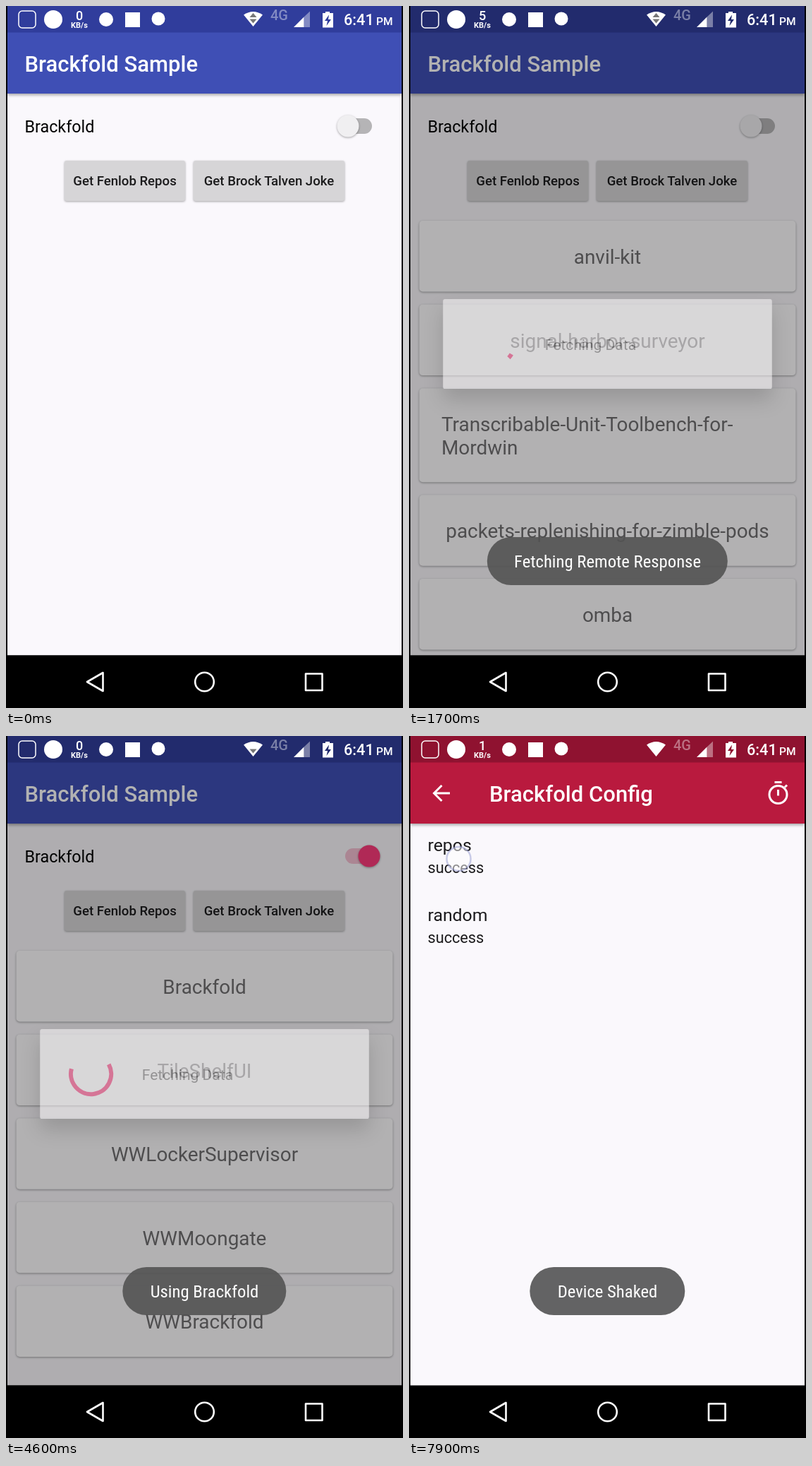
Write an HTML page that moves like this. It is 563 px wide and 994 px high and loops after 8000 ms.

```html
<!DOCTYPE html>
<html lang="en">
<head>
<meta charset="utf-8">
<title>Brackfold Sample</title>
<style>
  html, body { margin: 0; width: 100%; height: 100%; overflow: hidden; background: #000; }
  svg { display: block; width: 563px; height: 994px; font-family: Roboto, "Noto Sans", sans-serif; }
  .bar { filter: drop-shadow(0 2px 2px rgba(0,0,0,.35)); }
  .btn { fill: #d6d5d7; filter: drop-shadow(0 1px 1.5px rgba(0,0,0,.35)); }
  .btn.down { filter: drop-shadow(0 3px 4px rgba(0,0,0,.4)); }
  .btnText { font-size: 18.6px; font-weight: 500; fill: #1b1b1c; }
  .title { font-size: 31px; font-weight: 500; fill: #fff; }
  .card { fill: #fefdff; filter: drop-shadow(0 1.5px 1.5px rgba(0,0,0,.36)); }
  .cardText { font-size: 27.9px; fill: #6f6e70; }
  .mid { text-anchor: middle; }
  .thumb { filter: drop-shadow(0 1px 1.5px rgba(0,0,0,.35)); }
  .dialog { fill: #fffdff; filter: drop-shadow(0 16px 14px rgba(0,0,0,.3)); }
  .toastText { font-family: "Roboto Condensed", Roboto, sans-serif; fill: #fff; text-anchor: middle; }
  .line { fill: none; stroke: #fff; }
  #keys { filter: drop-shadow(0 1px 1px rgba(0,0,0,.3)); }
</style>
</head>
<body>
<svg viewBox="0 0 563 994">
  <defs>
    <clipPath id="listClip"><rect x="2" y="291.5" width="559" height="628"/></clipPath>
    <clipPath id="btnClip"><rect x="83" y="219" width="171" height="57" rx="3"/></clipPath>
    <clipPath id="screen"><rect x="2" width="559" height="994"/></clipPath>
  </defs>
  <rect width="563" height="994"/>

  <g clip-path="url(#screen)">
    <g id="main">
      <rect x="2" width="559" height="919.5" fill="#faf8fc"/>
      <rect class="bar" x="2" y="37" width="559" height="87" fill="#3f4fb5"/>
      <rect x="2" width="559" height="37.5" fill="#303d9c"/>
      <text class="title" x="26.5" y="93">Brackfold Sample</text>
      <text x="26.5" y="179" font-size="23.3">Brackfold</text>
      <rect id="track" x="481" y="159" width="38" height="22" rx="11"/>
      <circle id="halo" cy="170.500" r="30" fill="#fb3a7b"/>
      <circle id="thumb" class="thumb" cy="170" r="15.500"/>
      <rect id="repoBtn" class="btn" x="83" y="219" width="171" height="57" rx="3"/>
      <g clip-path="url(#btnClip)"><circle id="ripple" cx="181" cy="248" fill="#000"/></g>
      <text class="btnText mid" x="168.500" y="254">Get Fenlob Repos</text>
      <rect class="btn" x="266" y="219" width="214" height="57" rx="3"/>
      <text class="btnText mid" x="373" y="254">Get Brock Talven Joke</text>
      <g clip-path="url(#listClip)">
        <g id="remote"></g>
        <g id="local"></g>
      </g>
      <rect id="dim" x="2" width="559" height="919.500"/>
    </g>

    <g id="config">
      <rect x="2" width="559" height="994" fill="#faf8fc"/>
      <g id="configBody">
        <rect class="bar" x="2" y="37" width="559" height="87" fill="#b91a3e"/>
        <path class="line" stroke-width="3" d="M58 81H36M46.500 70L35.500 81l11 11"/>
        <text class="title" x="114" y="93">Brackfold Config</text>
        <g class="line" stroke-width="3">
          <circle cx="523.500" cy="83" r="12.500"/>
          <path d="M518.500 65.500h10M523.500 76v8.500M533 72.500l3-3"/>
        </g>
        <g fill="#1c1b1d">
          <text x="26.500" y="163" font-size="24.8">repos</text>
          <text x="26.500" y="194" font-size="21.700">success</text>
          <text x="26.500" y="262" font-size="24.8">random</text>
          <text x="26.500" y="293" font-size="21.700">success</text>
        </g>
      </g>
      <rect x="2" width="559" height="37.500" fill="#8f1230"/>
    </g>
  </g>

  <rect id="nav" y="919.500" width="563" height="75"/>
  <g id="keys" class="line" stroke-width="2.600" stroke-linejoin="round">
    <path d="M115 957l22.500-13v26z"/>
    <circle cx="281.500" cy="957" r="13.300"/>
    <rect x="425" y="945.500" width="23.500" height="23.500"/>
  </g>

  <g id="dialog">
    <rect class="dialog" x="41" y="413" width="481" height="131" rx="3"/>
    <path id="spinner" fill="none" stroke="#f93a7c" stroke-width="6.200"/>
    <text x="190" y="487" font-size="21.700" fill="#757475">Fetching Data</text>
  </g>
  <g id="toast">
    <rect id="toastBox" y="752" height="68" rx="34" fill="#545454" fill-opacity=".9"/>
    <text id="toastText" class="toastText" x="281.500" y="795"></text>
  </g>

  <g fill="#fff">
    <rect class="line" x="18" y="7" width="24" height="24" rx="5" stroke-width="1.500"/>
    <circle cx="67" cy="19" r="13"/>
    <text id="rate" class="mid" x="104" y="20" font-size="18" font-weight="500"></text>
    <text class="mid" x="104" y="31" font-size="11" font-weight="700">KB/s</text>
    <circle cx="142" cy="19" r="10"/>
    <rect x="169" y="9" width="21" height="21"/>
    <circle cx="216" cy="18" r="9.500"/>
    <path d="M337 12.500Q350.500 3.500 364 12.500L350.500 29z"/>
    <path id="up" d="M345.500 16l5-6 5 6z" fill="#777"/>
    <path id="down" d="M345.500 18.500h10l-5 6z" fill="#777"/>
    <text x="375" y="20" font-size="20" font-weight="500" opacity=".4">4G</text>
    <path d="M408 30L422.500 15.500V30z"/>
    <path d="M422.500 15.500L431 7.500V30h-8.500z" opacity=".4"/>
    <path fill-rule="evenodd" d="M449 10h4V8h6v2h5v20.500h-15zM458 12.500l-6 8.500h4l-1.500 7 6.500-9h-4z"/>
    <text x="479" y="27" font-size="21.700" font-weight="500">6:41</text>
    <text x="525" y="27" font-size="15.500" font-weight="500">PM</text>
  </g>
  <circle id="touch" r="17" fill="#fff" fill-opacity=".5" stroke="#969bd2" stroke-opacity=".5" stroke-width="2.500"/>
</svg>

<script>
const LOOP = 8000, STEP = 100;
const $ = id => document.getElementById(id);
const set = (id, attrs) => {
  for (const key in attrs) $(id).setAttribute(key, attrs[key]);
};
const ramp = (t, from, to) => Math.min(1, Math.max(0, (t - from) / (to - from)));
const smooth = x => x * x * (3 - 2 * x);
const show = (id, on) => set(id, { opacity: on ? 1 : 0 });

const remoteRepos = [
  ["anvil-kit"],
  ["signal-harbor-surveyor"],
  ["Transcribable-Unit-Toolbench-for-", "Mordwin"],
  ["packets-replenishing-for-zimble-pods"],
  ["omba"],
  ["graft-zimblestatistic"]
];
const localRepos = [["Brackfold"], ["TileShelfUI"], ["WWLockerSupervisor"], ["WWMoongate"], ["WWBrackfold"]];

function cards(repos) {
  let y = 304;
  return repos.map(lines => {
    const height = 100.5 + 32.5 * (lines.length - 1);
    const place = lines.length > 1 ? 'x="46"' : 'x="281.500" text-anchor="middle"';
    const text = lines.map((s, i) =>
      `<text class="cardText" ${place} y="${y + 61 + i * 32.5}">${s}</text>`).join("");
    const card = `<rect class="card" x="14.500" y="${y}" width="534" height="${height}" rx="5"/>`;
    y += height + 18.1;
    return card + text;
  }).join("");
}
$("remote").innerHTML = cards(remoteRepos);
$("local").innerHTML = cards(localRepos);

// Condensed lettering is larger; plain Roboto is set smaller to suit the pill.
const pen = document.createElement("canvas").getContext("2d");
pen.font = '24.8px "Roboto Condensed", Roboto, sans-serif';
const toastSize = 24.8 * Math.min(1, 265 / pen.measureText("Fetching Remote Response").width);
set("toastText", { "font-size": toastSize });

const toasts = [
  { text: "Fetching Remote Response", width: 341, start: 350, rise: 200, end: 2300, fall: 400 },
  { text: "Using Brackfold", width: 232, start: 4150, rise: 200, end: 6100, fall: 250 },
  { text: "Device Shaked", width: 220, start: 6930, rise: 200, end: 9000, fall: 400 }
];
const dialogs = [
  { start: 350, spin: 490, end: 1600 },
  { start: 4150, spin: 4250, end: 4500 }
];
// start, end, x, y, vertical travel
const touches = [
  [100, 400, 182, 245, 0],
  [2200, 2500, 107, 750, -106],
  [3100, 3300, 497, 172, 0],
  [3900, 4200, 182, 245, 0],
  [7900, 8000, 70.5, 174, 0]
];
const rates = [[0, 0], [800, 5], [1800, 14], [2800, 0], [6800, 1]];

function arc(startTurn, endTurn) {
  const point = a => {
    const r = a * 2 * Math.PI;
    return `${115.6 + 29.5 * Math.cos(r)} ${478.5 + 29.5 * Math.sin(r)}`;
  };
  const large = endTurn - startTurn > .5 ? 1 : 0;
  return `M${point(startTurn)}A29.5 29.5 0 ${large} 1 ${point(endTurn)}`;
}

function drawSpinner(age) {
  const phase = age / 1333 % 1;
  const ease = x => 1 - Math.pow(1 - smooth(x), 2);
  const tail = .75 * ease(ramp(phase, .5, 1));
  const head = .75 * ease(ramp(phase, 0, .5)) + .03;
  const turn = -.25 + phase * .25 + 2 * age / 6665;
  set("spinner", { d: arc(turn + tail, turn + head) });
}

function drawDialog(t) {
  const d = dialogs.find(d => t >= d.start && t < d.end + 200);
  const alpha = d ? smooth(ramp(t, d.start, d.start + 200)) * (1 - ramp(t, d.end, d.end + 200)) : 0;
  const size = .94 + .06 * alpha;
  set("dialog", {
    opacity: alpha,
    transform: `translate(281.5 478.5) scale(${size}) translate(-281.5 -478.5)`
  });
  if (d) drawSpinner(Math.max(0, t - d.spin));
  return alpha;
}

function drawToast(t) {
  const toast = toasts.find(o => t >= o.start && t < o.end + o.fall);
  if (!toast) return show("toast", false);
  const { text, width, start, rise, end, fall } = toast;
  set("toast", { opacity: ramp(t, start, start + rise) * (1 - ramp(t, end, end + fall) ** 2) });
  set("toastBox", { x: 281.3 - width / 2, width });
  $("toastText").textContent = text;
}

function drawPress(t) {
  const down = [100, 3900].find(s => t >= s && t < s + 500);
  const age = down === undefined ? 0 : t - down;
  set("ripple", { r: 18 + age * .125, opacity: age ? .11 * (1 - ramp(age, 250, 500)) : 0 });
  $("repoBtn").classList.toggle("down", age > 0 && age < 400);
}

function drawSwitch(t) {
  const on = smooth(ramp(t, 3150, 3450));
  const mix = (a, b) => `rgb(${a.map((v, i) => Math.round(v + (b[i] - v) * on))})`;
  set("track", { fill: mix([181, 180, 182], [245, 192, 210]) });
  set("thumb", { cx: 485 + 30 * on, fill: mix([240, 239, 241], [251, 58, 123]) });
  set("halo", { cx: 485 + 30 * on, opacity: .18 * ramp(t, 3050, 3200) * (1 - ramp(t, 3250, 3500)) });
}

function drawTouch(t) {
  const hit = touches.find(([from, to]) => t >= from && t < to);
  show("touch", hit);
  if (hit) set("touch", { cx: hit[2], cy: hit[3] + hit[4] * smooth(ramp(t, 2200, 2400)) });
}

function drawWindows(t, dialogAlpha) {
  const leave = ramp(t, 7000, 7100);
  set("main", { transform: `translate(${28.15 * leave} ${110 * leave}) scale(${1 - .1 * leave})` });
  set("dim", { opacity: Math.max(.6 * dialogAlpha, .4 * leave) });
  show("main", t < 7500);

  const slide = t < 7500 ? 269 * Math.exp((7100 - t) / 100) : 0;
  set("config", { transform: `translate(0 ${slide})` });
  show("config", t >= 7100);
  set("configBody", { opacity: .04 + .96 * ramp(t, 7100, 7400) });
  set("nav", { opacity: t < 7100 ? 1 : ramp(t, 7250, 7500) });
}

function draw(t) {
  const scroll = 105.6 * smooth(ramp(t, 2200, 2400)) + 1.7 * ramp(t, 2400, 2500);
  set("remote", { transform: `translate(0 ${-scroll})` });
  show("remote", t >= 1600 && t < 4500);
  show("local", t >= 4500);
  drawWindows(t, drawDialog(t));
  drawToast(t);
  drawPress(t);
  drawSwitch(t);
  drawTouch(t);
  $("rate").textContent = rates.filter(([from]) => t >= from).pop()[1];
  show("up", t < 2800);
  show("down", t < 4800);
}

const began = performance.now();
function tick() {
  const t = (performance.now() - began) % LOOP;
  draw(Math.floor(t / STEP) * STEP);
  requestAnimationFrame(tick);
}
tick();
</script>
</body>
</html>
```
